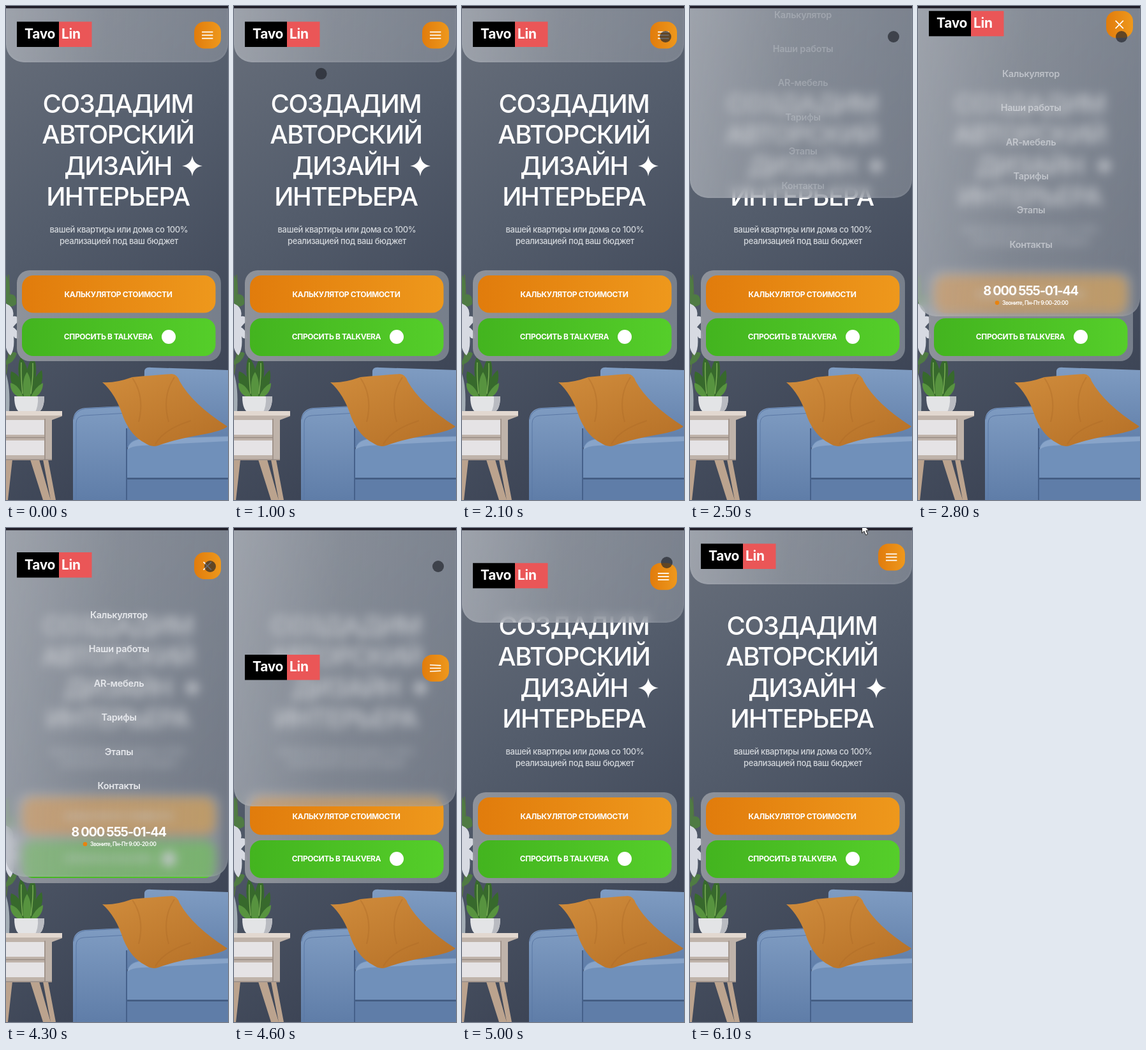
An HTML page for the animation above (6.2 s loop, 348x772 px).

```html
<!DOCTYPE html>
<html lang="ru">
<head>
<meta charset="utf-8">
<style>
html, body { margin: 0; width: 100%; height: 100%; overflow: hidden; background: #4d5666; }
svg { position: absolute; left: 0; top: 0; display: block; font-family: Inter, sans-serif; }
#panel {
  position: absolute; left: 0; top: 0; width: 348px; overflow: hidden;
  border-radius: 0 0 28px 28px; backdrop-filter: blur(8px);
  background: linear-gradient(95deg, rgba(184,188,195,.68), rgba(161,166,174,.6) 45%, rgba(149,155,165,.56));
  box-shadow: inset 0 -1px 4px rgba(200,205,212,.15);
}
.mid { text-anchor: middle; }
.title { font-size: 40px; font-weight: 500; letter-spacing: -1.4px; fill: #fff; }
.lead { font-size: 13px; font-weight: 500; letter-spacing: -.35px; fill: #d3d7dc; }
.button { font-size: 12px; font-weight: 700; letter-spacing: -.4px; fill: #fff; }
.item { font-size: 14.5px; font-weight: 600; letter-spacing: -.3px; fill: #e6e8ec; }
.phone { font-size: 20px; font-weight: 700; letter-spacing: -1.3px; fill: #fff; }
.hours { font-size: 8.5px; font-weight: 600; letter-spacing: -.5px; fill: #fff; }
.logo { font: 700 21px Inter, sans-serif; letter-spacing: -.3px; fill: #fff; }
</style>
</head>
<body>
<svg width="348" height="772">
  <defs>
    <linearGradient id="wall" x2=".35" y2="1">
      <stop stop-color="#686f7b"/><stop offset=".45" stop-color="#545d6c"/><stop offset="1" stop-color="#3c4455"/>
    </linearGradient>
    <linearGradient id="orange"><stop stop-color="#e17c0c"/><stop offset="1" stop-color="#ee981c"/></linearGradient>
    <linearGradient id="green"><stop stop-color="#43b41f"/><stop offset="1" stop-color="#55ce2a"/></linearGradient>
    <linearGradient id="box"><stop stop-color="#92969e"/><stop offset=".5" stop-color="#858b94"/><stop offset="1" stop-color="#7a828e"/></linearGradient>
    <linearGradient id="sofa" x2="0" y2="1"><stop stop-color="#7f9cc2"/><stop offset="1" stop-color="#5f7da8"/></linearGradient>
    <linearGradient id="pillow" x2=".7" y2="1"><stop stop-color="#d08c3c"/><stop offset="1" stop-color="#b87329"/></linearGradient>
  </defs>
  <rect width="348" height="772" fill="url(#wall)"/>

  <g id="flowers">
    <path d="M0 575Q6 540 8 500M2 560Q10 520 4 420" stroke="#557046" stroke-width="2" fill="none"/>
    <path d="M0 420q8 12 4 34l-4 4zM0 452q18-6 16 14q-10 8-16-2zM0 555q8-20 17-12q-4 14-17 18z" fill="#4f7b43"/>
    <path d="M0 465q14 6 11 20q9-2 8 8q-6 6-8 9q9 5 9 17q-6 2-8-3q2 20-5 30q-5-4-7-12z" fill="#d7dae2"/>
    <path d="M0 575q7 20 5 58H0z" fill="#a4aeb6"/>
  </g>

  <g id="plant">
    <g fill="#37692c">
      <path d="M23 611Q3 590 8 571Q26 576 30 611zM27 611Q14 566 23 549Q38 562 37 611z"/>
      <path d="M31 611Q28 566 42 549Q53 562 41 611zM37 611Q42 580 56 569Q61 588 45 611z"/>
    </g>
    <path d="M20 611Q6 604 7 589Q20 592 27 611zM39 611Q46 595 58 589Q58 604 46 611zM28 611Q24 584 33 572Q42 586 38 611z" fill="#57933f"/>
    <path d="M26 606Q23 577 24 557M39 606Q43 577 42 558" stroke="#79ad55" stroke-width="1.500" fill="none"/>
    <path d="M13 610H60Q60 636 45 636H26Q13 635 13 610z" fill="#e3e4e6"/>
    <path d="M50 610H60Q60 636 45 636Q51 626 50 610z" fill="#b9bbc1"/>
  </g>

  <g id="table">
    <path d="M38 709H52L70 772H58zM58 709H66L78 772H70zM0 709H10L3 772H0z" fill="#bba38e"/>
    <path d="M0 633H88V641L72 647V710H0z" fill="#bfb3aa"/>
    <path d="M0 633H88V640H0z" fill="#e2d8d0"/>
    <path d="M0 647H60V670H0zM0 679H60V702H0z" fill="#e5e3e5"/>
    <path d="M0 674.500H61M61 645V709M0 709H72" stroke="#988b83" stroke-width="1.500"/>
  </g>

  <g id="couch">
    <path d="M217 570Q218 564 228 565L348 569V690H190V630L216 630z" fill="url(#sofa)"/>
    <path d="M190 694Q192 678 212 676L348 672V745H188z" fill="#7090ba"/>
    <path d="M191 693Q193 679 212 677L348 673V680L212 687Q196 688 191 693z" fill="#88a4c9"/>
    <path d="M188 738H348V772H188z" fill="#5f7da8"/>
    <path d="M189 738.500H348" stroke="#3f587e" stroke-width="2.500"/>
    <path d="M105 648Q106 630 124 628L206 624Q216 626 212 638L194 652Q189 658 189 676V772H105z" fill="url(#sofa)"/>
    <path d="M106 646Q108 632 124 629L206 625Q214 627 210 635L122 640Q110 641 110 652V772" fill="none" stroke="#5b78a5"/>
    <path d="M189 660V772" stroke="#45608a" stroke-width="2"/>
    <path d="M151 588Q170 590 198 580Q232 577 260 575Q269 576 272 586Q292 622 347 657Q340 664 306 670Q262 678 238 687Q228 690 218 683Q196 672 184 643Q172 606 151 588z" fill="url(#pillow)"/>
    <path d="M198 581Q218 610 208 650M264 580Q244 610 255 650M234 685Q246 662 290 648" stroke="#a96725" stroke-width="2" fill="none" opacity=".35"/>
  </g>

  <g class="title mid">
    <text x="175.500" y="167">СОЗДАДИМ</text>
    <text x="175.500" y="215">АВТОРСКИЙ</text>
    <text x="175.500" y="263.500">ДИЗАЙН</text>
    <text x="175.500" y="312">ИНТЕРЬЕРА</text>
  </g>
  <path d="M292 234Q294 248 308 250Q294 252 292 266Q290 252 276 250Q290 248 292 234z" fill="#fff"/>
  <g class="lead mid">
    <text x="177" y="354">вашей квартиры или дома со 100%</text>
    <text x="177" y="372">реализацией под ваш бюджет</text>
  </g>

  <rect x="17" y="413" width="320" height="142" rx="20" fill="url(#box)" opacity=".94"/>
  <rect x="25" y="421" width="303.500" height="58.500" rx="18" fill="url(#orange)"/>
  <rect x="25" y="488" width="303.500" height="59" rx="18" fill="url(#green)"/>
  <g class="button mid">
    <text x="176" y="455">КАЛЬКУЛЯТОР СТОИМОСТИ</text>
    <text x="160.500" y="521">СПРОСИТЬ В TALKVERA</text>
  </g>
  <circle cx="255" cy="517" r="11" fill="#fff"/>
</svg>

<div id="panel">
  <svg width="348" height="772">
    <g id="menu">
      <g id="items" class="item mid"></g>
      <text class="phone mid" x="176.500" y="482">8 000 555-01-44</text>
      <circle cx="124" cy="494" r="3.300" fill="#e8830f"/>
      <text class="hours" x="132" y="497">Звоните, Пн-Пт 9:00-20:00</text>
    </g>
    <g id="bar">
      <path d="M17-19.500H83V20H17z"/>
      <path d="M83-19.500H134.500V20H83z" fill="#ea5657"/>
      <text class="logo" x="29" y="7">Tavo</text>
      <text class="logo" x="87" y="7">Lin</text>
      <rect x="295" y="-19.500" width="42" height="42" rx="16" fill="url(#orange)"/>
      <g id="burger" stroke="#fff" stroke-width="1.700" transform="translate(315.700 1.700)">
        <path d="M-8.700 0H8.700"/><path d="M-8.700 0H8.700"/><path d="M-8.700 0H8.700"/>
      </g>
    </g>
  </svg>
</div>

<svg width="348" height="772">
  <rect width="348" height="3.500" fill="#1e1c27"/>
  <circle id="dot" r="9" fill="#20242b" opacity=".68"/>
  <path id="arrow" d="M0 0V15L3.500 12L6 18L9 16.700L6.500 11H11z" fill="#fff" stroke="#222"/>
</svg>

<script>
const LOOP = 6200, OPEN_AT = 2225, CLOSE_AT = 4425, SLIDE = 1000, TURN = 260;
const CLOSED = 88, OPENED = 545;
const $ = id => document.getElementById(id);
const clamp = v => Math.min(1, Math.max(0, v));
const set = (el, value) => el.setAttribute('transform', value);

$('items').innerHTML = ['Калькулятор', 'Наши работы', 'AR-мебель', 'Тарифы', 'Этапы', 'Контакты']
  .map((label, i) => `<text x="177" y="${141 + i * 53.4}">${label}</text>`).join('');

// cubic-bezier(.25, .1, .25, 1)
function ease(x) {
  let lo = 0, hi = 1;
  const curve = (a, b, s) => 3 * a * s * (1 - s) ** 2 + 3 * b * s * s * (1 - s) + s ** 3;
  for (let i = 0; i < 20; i++) {
    const s = (lo + hi) / 2;
    if (curve(.25, .25, s) < x) lo = s; else hi = s;
  }
  return curve(.1, 1, lo);
}

// pointer stops: time, x, y
const stops = [
  [100, 290, 10], [300, 45, 330], [500, 190, 759], [700, 300, 557],
  [1100, 107, 24], [1400, 319, 48], [3900, 319, 48],
  [4300, 320, 60], [4700, 320, 60], [5000, 321, 54], [5600, 321, 54], [6000, 276, 4]
];

function pointerAt(t) {
  const i = stops.findIndex(s => s[0] > t);
  if (i < 1) return null;
  const [t0, x0, y0] = stops[i - 1], [t1, x1, y1] = stops[i];
  const k = (t - t0) / (t1 - t0), s = k * k * (3 - 2 * k);
  return [x0 + (x1 - x0) * s, y0 + (y1 - y0) * s];
}

function draw(t) {
  const open = t >= OPEN_AT && t < CLOSE_AT;
  const phase = duration =>
    ease(clamp((t - OPEN_AT) / duration)) - ease(clamp((t - CLOSE_AT) / duration));
  const height = CLOSED + (OPENED - CLOSED) * phase(SLIDE);
  const shift = (height - OPENED) / 2;

  $('panel').style.height = height + 'px';
  $('menu').style.display = open ? '' : 'none';
  $('items').style.opacity = clamp((t - OPEN_AT) / SLIDE);
  set($('menu'), `translate(0 ${shift})`);
  set($('bar'), `translate(0 ${open ? shift + 57.5 : height / 2})`);

  const turn = phase(TURN);
  [...$('burger').children].forEach((line, i) => {
    const side = i - 1;
    set(line, `translate(0 ${side * 5 * (1 - turn)}) rotate(${-side * 45 * turn})`);
    line.style.opacity = side ? 1 : 1 - turn;
  });

  const pos = pointerAt(t);
  $('dot').style.display = pos ? '' : 'none';
  if (pos) set($('dot'), `translate(${pos})`);
  $('arrow').style.display = t >= 6000 ? '' : 'none';
  set($('arrow'), 'translate(269.5 -7)');
}

function frame() {
  draw(performance.now() % LOOP);
  requestAnimationFrame(frame);
}
frame();
</script>
</body>
</html>
```
